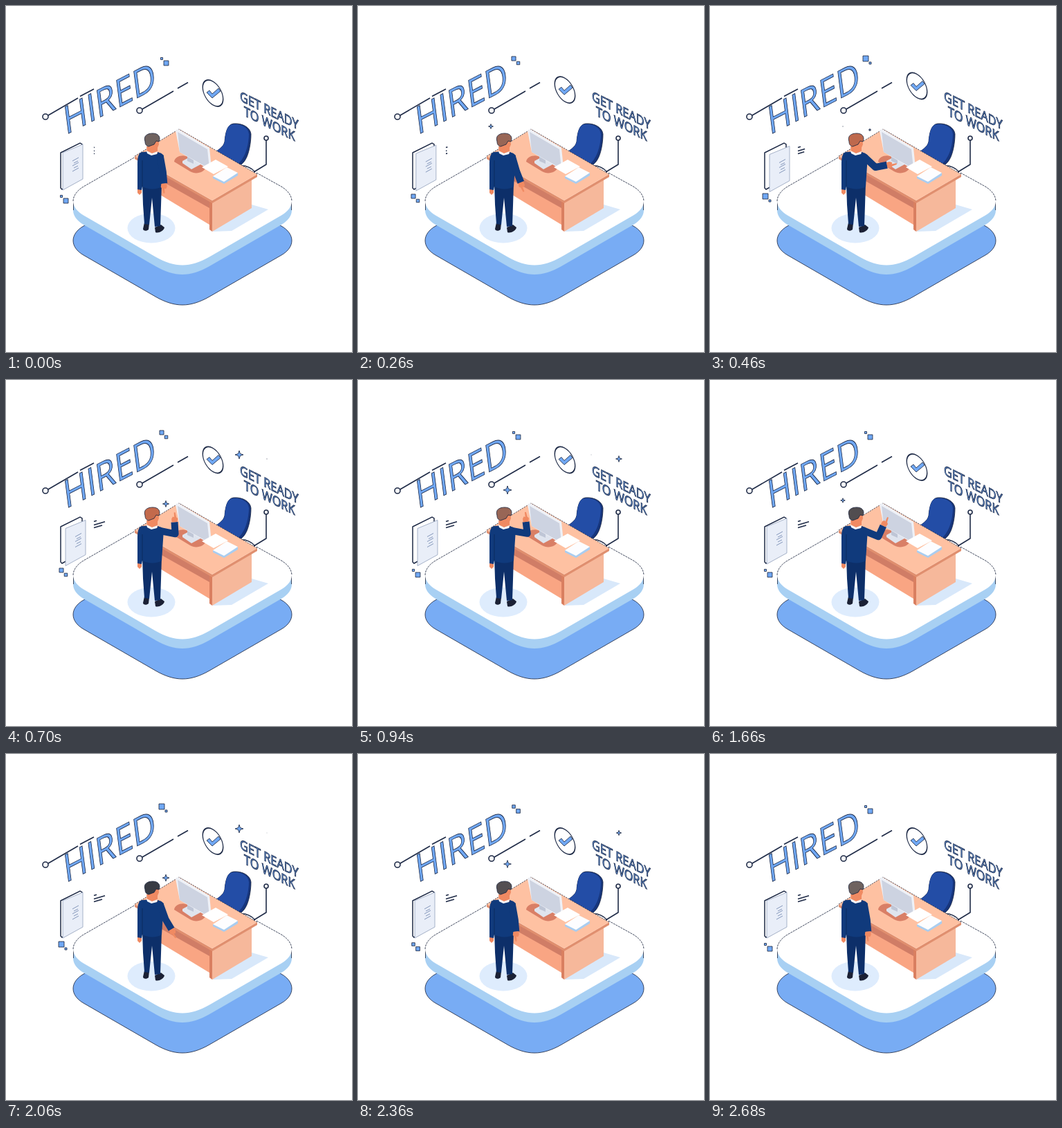
Write an HTML page that moves like this. It is 500 px wide and 500 px high and loops after 2.74 s.

```html
<!DOCTYPE html>
<html lang="en">
<head>
<meta charset="utf-8">
<title>Hired</title>
<style>
html, body { margin: 0; width: 100%; height: 100%; overflow: hidden; background: #fff; }
svg { display: block; width: 100vw; height: 100vh; }
text { font-family: "Open Sans", "Noto Sans", sans-serif; fill: #70a8f4; stroke: #1c2b4c; stroke-width: .9; }
.line { fill: none; stroke: #1f2b47; stroke-width: 1.6; }
.edge { stroke: #17213a; stroke-width: .8; }
.blue { fill: #70a8f4; }
.navy { fill: #103a7c; }
.skin { fill: #f08a62; }
</style>
</head>
<body>
<svg viewBox="0 0 500 500">
  <defs>
    <path id="slab" d="M112 262L216 202C244 186 266 186 294 202L398 262C418 273.500 418 292.500 398 304L294 364C266 380 244 380 216 364L112 304C92 292.500 92 273.500 112 262Z"/>
  </defs>

  <!-- platform -->
  <use href="#slab" y="56" fill="#78acf4" class="edge"/>
  <use href="#slab" y="12" fill="#a8d0f3"/>
  <path d="M97.500 282V295M412.500 282V295" class="edge"/>
  <use href="#slab" y="-1.500" fill="#fff"/>
  <path d="M97 282C97 275 102 267 112 261L187 218M362 241L398 261C408 267 413 275 413 282" class="edge" fill="none" stroke-dasharray="3 1"/>
  <ellipse cx="210" cy="321" rx="34.500" ry="21.500" fill="#deecfd"/>
  <path d="M298 326L355 287L379 294L326 325Z" fill="#d8e8fa"/>

  <!-- chair -->
  <path d="M336 231C345 230 354 233 360 240" class="line"/>
  <path d="M300 214C306 207 314 205 316 196C317 185 319 171 329 170C341 169 353 175 354 185C354 198 351 214 346 222C342 229 337 232 329 231Z" fill="#16357c" class="edge"/>
  <path d="M300 214C306 207 314 205 316 196C317 185 319 171 328 171C339 170 350 175 351 185C351 198 347 213 342 220C338 227 334 230 327 229Z" fill="#234da6"/>

  <!-- desk -->
  <path d="M200 226L294 282V316L200 259Z" fill="#f9a583"/>
  <path d="M200 226L294 282V292L200 239Z" fill="#d07d66"/>
  <path d="M294 282L298 284V326L294 323Z" fill="#d97f60"/>
  <path d="M298 284L355 250V292L298 326Z" fill="#f6b89b"/>
  <path d="M186 217L298 281L363 243V247L298 285L186 221Z" fill="#e08f6f"/>
  <path d="M186 217L250 178L363 243L298 281Z" fill="#fec1a2"/>
  <path d="M186 217L250 178L363 243" class="edge" fill="none" stroke-dasharray="2 1.500"/>
  <path d="M243 225C244 216 258 214 264 219L289 233C286 241 274 244 266 239Z" fill="#d97f66"/>

  <!-- monitor and papers -->
  <path d="M255 224L268 217L281 225V229L268 236L255 227Z" fill="#dfe4ee"/>
  <path d="M262 208L271 213V228L262 224Z" fill="#bfc6d6"/>
  <path d="M245 180L249 178L294 205L297 234L293 236L251 211Z" fill="#eef1f7"/>
  <path d="M248 182L291 207L294 235L251 211Z" fill="#cdd3e1"/>
  <path d="M283 233L303 222L321 232L300 243Z" fill="#fff"/>
  <path d="M299 246V249L315 257L335 245V241Z" fill="#a9cdf0"/>
  <path d="M299 246L319 233L335 241L315 254Z" fill="#fdfdff"/>

  <!-- man -->
  <path d="M200 313L207 314L206 323C203 326 198 325 198 322ZM215 320L224 316L229 320C228 325 220 329 216 327Z" fill="#1b2135"/>
  <path d="M197 256H225L224 288L223 318L215 319L211 277L207 316L200 315L198 287Z" fill="#0d2f69"/>
  <path d="M190 263H196V270L193 273L190 270Z" class="skin"/>
  <path d="M197 211C190 212 190 222 190 231V265L196 266L197 261C206 266 219 265 225 261L228 216C225 212 219 211 215 210Z" class="navy"/>
  <path d="M197 223V261" stroke="#0b2a5e" fill="none"/>
  <path d="M203 203H219V213C214 216 207 214 204 210Z" class="skin"/>
  <path d="M203 209L211 213L219 210L218 214L210 216L204 213Z" fill="#f5f7fb"/>
  <path d="M204 192H220L221 200L218 207L207 208Z" class="skin"/>
  <path id="hair" d="M201 196C198 187 205 184 212 184C220 184 224 189 221 196L217 195L214 200L206 203C202 202 201 199 201 196Z" class="edge"/>
  <path id="arm" fill="none" stroke="#103a7c" stroke-width="10" stroke-linejoin="round"/>
  <path id="hand" d="M-4 0L-4 -5L-2 -8L0 -7L0 -14L2 -14L3 -7L5 -5L4 0Z" class="skin"/>

  <!-- captions -->
  <path d="M61 158L104 133M107 130.500L127 120M197 149L242 123M248 119L263 110.500" class="line"/>
  <circle cx="57" cy="160" r="4" class="line"/>
  <circle cx="193" cy="151" r="4" class="line"/>
  <text transform="matrix(.84 -.433 .13 1 86 186.500)" font-size="54">HIRED</text>
  <g transform="matrix(.86 .43 0 1 338 136.500)" font-size="19">
    <text>GET READY</text>
    <text x="7" y="19">TO WORK</text>
  </g>
  <path d="M376 194V229L358 240" class="line"/>
  <circle cx="376" cy="191" r="3" class="line"/>
  <g id="badge">
    <circle r="17" transform="matrix(.866 .5 0 1 0 0)" class="line"/>
    <path d="M-9 -1L-5 -4L-1 1L8 -7L11 -3L-1 7Z" class="blue edge"/>
  </g>

  <!-- document -->
  <path d="M79 212L107 198L110 200V249L81 265L79 263Z" fill="#fff" stroke="#1f2b47" stroke-width="1.500"/>
  <g id="page">
    <path d="M82 212L111 200V250L82 266Z" fill="#e9eef8" stroke="#93a1bb" stroke-width=".8"/>
    <path d="M96 224l9 -5M98 227l6 -3M96 231l9 -5M98 234l6 -3M96 239l9 -5" stroke="#8497bb"/>
  </g>
  <path id="notes" class="line"/>
  <path id="squares" class="blue edge"/>
  <path id="stars" class="blue edge"/>
</svg>

<script>
const LOOP = 2740, HALF = LOOP / 2, TWINKLE = 250;
const $ = id => document.getElementById(id);
const set = (id, name, value) => $(id).setAttribute(name, value);
const mix = (a, b, k) => a + (b - a) * k;

// eased step from 0 to 1 between two times
const ramp = (t, from, to) => {
  const x = Math.min(1, Math.max(0, (t - from) / (to - from)));
  return x * x * (3 - 2 * x);
};
// smooth hump of height 1 around a time
const bump = (t, peak, width) => {
  const x = Math.min(1, Math.abs(t - peak) / width);
  return (1 + Math.cos(Math.PI * x)) / 2;
};
const reach = (x, y, length, degrees) => {
  const a = degrees * Math.PI / 180;
  return [x + length * Math.cos(a), y + length * Math.sin(a)];
};

const stars = [
  { x: 192, y: 174, size: 3.5, peak: 250 },
  { x: 231, y: 179, size: 6, peak: 620 },
  { x: 337, y: 108, size: 6, peak: 710 },
  { x: 377, y: 114, size: 4.5, peak: 920 },
  { x: 216, y: 159, size: 6, peak: 940 },
  { x: 360, y: 93, size: 5, peak: 1300 }
];

function drawMan(t) {
  const up = ramp(t, 150, 750) - ramp(t, 1450, 2250);
  const bend = mix(85, -97, up);
  const elbow = reach(223, 218, 22, mix(80, 10, up));
  const wrist = reach(...elbow, 17, bend);
  set("arm", "d", `M223 218L${elbow}L${wrist}`);
  set("hand", "transform", `translate(${wrist}) rotate(${bend + 90})`);

  const warm = bump(t, 600, 650), dark = bump(t, 2000, 700);
  set("hair", "fill",
    `rgb(${110 + 90 * warm - 55 * dark}, ${98 + 8 * warm - 40 * dark}, ${95 - 20 * warm - 28 * dark})`);
}

function drawPapers(t) {
  const open = ramp(t, 120, 420) - ramp(t, 1360, 1620);
  set("page", "transform", `translate(${4 * open} ${2.5 * open})`);
  set("badge", "transform", `translate(299 ${126 - 10.5 * open})`);

  const row = (y, length, delay) => {
    const w = 1 + length * ramp(t, delay, delay + 420);
    return `M127 ${y}l${w} ${-w * .3}`;
  };
  set("notes", "d", row(204.5, 3, 60) + row(209.5, 15, 220) + row(213.5, 11, 180));
}

function drawSquares(t) {
  const swap = bump(t, 480, 520) + bump(t, 2080, 450);
  const square = (x, y, s) => `M${x - s / 2} ${y - s / 2}h${s}v${s}h${-s}z`;
  const pair = (x, y) =>
    square(x, y, mix(3, 8, swap)) + square(x + 6.5, y + 6.5, mix(7, 3, swap));
  set("squares", "d", pair(225, 76) + pair(80, 275));
}

// each star twinkles once per half loop, if the twinkle can still end
function drawStars(t) {
  let d = "";
  for (const { x, y, size, peak } of stars) {
    const again = peak + HALF < LOOP - TWINKLE ? bump(t, peak + HALF, TWINKLE) : 0;
    const r = size * (bump(t, peak, TWINKLE) + again);
    if (r < .05) continue;
    for (let i = 0; i < 8; i++)
      d += (i ? "L" : "M") + reach(x, y, i % 2 ? r * .35 : r, i * 45);
    d += "Z";
  }
  set("stars", "d", d);
}

const start = performance.now();
function tick() {
  const t = (performance.now() - start) % LOOP;
  drawMan(t);
  drawPapers(t);
  drawSquares(t);
  drawStars(t);
  requestAnimationFrame(tick);
}
tick();
</script>
</body>
</html>
```
